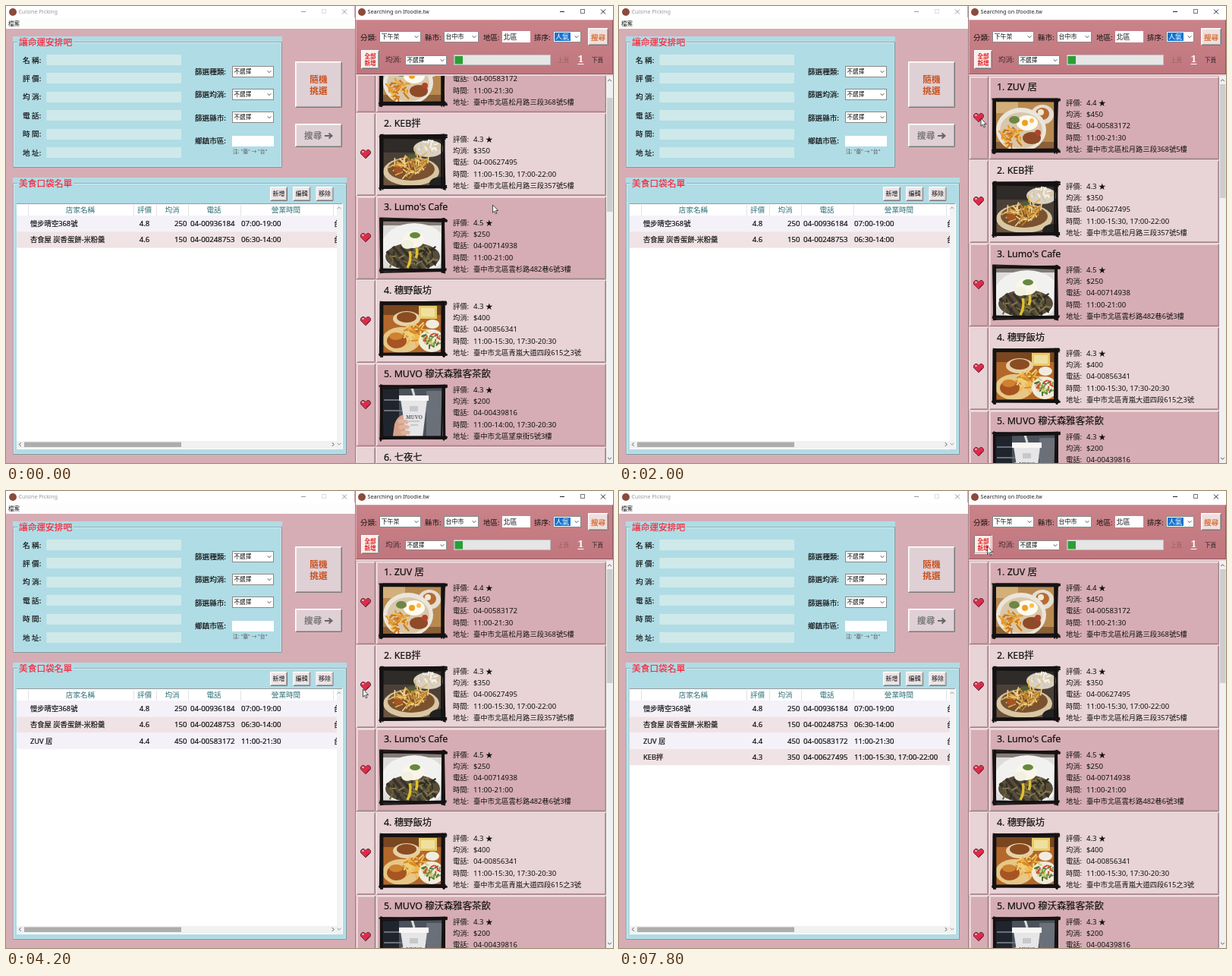
An HTML page that plays this animation: 800 px wide and 602 px high, repeating every 8 s.

```html
<!DOCTYPE html>
<html lang="zh-Hant">
<head>
<meta charset="utf-8">
<style>
html, body { margin: 0; width: 100%; height: 100%; overflow: hidden; background: #fff; }
svg { display: block; }
text { font-family: "Noto Sans", "Noto Sans CJK TC", "Noto Sans CJK", sans-serif; white-space: pre; }
.mid { font-weight: 500; stroke: currentColor; stroke-width: .2; }
.bold { font-weight: 700; }
.serif { font-family: "Noto Serif", serif; font-weight: 700; }
</style>
</head>
<body>
<svg id="stage" width="800" height="602" viewBox="0 0 800 602"></svg>
<script>
const LOOP = 8000, PINK = '#d6adb4', PALE = '#e8d3d6', BLUE = '#b0dce5';

// Drawing helpers; text is placed by its vertical centre
const rect = (x, y, w, h, fill, extra = '') =>
  `<rect x="${x}" y="${y}" width="${w}" height="${h}" fill="${fill}" ${extra}/>`;
const path = (d, stroke, width = 1, extra = '') =>
  `<path d="${d}" fill="none" stroke="${stroke}" stroke-width="${width}" ${extra}/>`;
const oval = (fill, x, y, rx, ry = rx) =>
  `<ellipse cx="${x}" cy="${y}" rx="${rx}" ry="${ry}" fill="${fill}"/>`;
const text = (x, y, str, size = 9.5, fill = '#111', cls = '', anchor = 'start') =>
  `<text x="${x}" y="${y + size * .37}" font-size="${size}" fill="${fill}" color="${fill}" class="${cls}" text-anchor="${anchor}">${str}</text>`;
const centred = (x, y, str, size, fill, cls) => text(x, y, str, size, fill, cls, 'middle');

const bevel = (x, y, w, h, light, dark) =>
  path(`M${x + .5} ${y + h - .5}V${y + .5}H${x + w - .5}`, light) +
  path(`M${x + w - .5} ${y + .5}V${y + h - .5}H${x + .5}`, dark);
const button = (x, y, w, h, fill) =>
  rect(x, y, w, h, fill) + bevel(x, y, w, h, '#fff', '#777') +
  bevel(x + 1, y + 1, w - 2, h - 2, '#f6eeef', '#aaa');
const chevron = (x, y, turn = 0, color = '#555') =>
  path('M-2.4 -1.2L0 1.2L2.4 -1.2', color, 1, `transform="translate(${x} ${y}) rotate(${turn})"`);
const combo = (x, y, w, h, str, size = 8) =>
  rect(x + .5, y + .5, w - 1, h - 1, '#fff', 'stroke="#888"') +
  text(x + 2.5, y + h / 2, str, size) + chevron(x + w - 6, y + h / 2);
const heading = (x, y, w, h, label) =>
  rect(x, y, w, h, BLUE) +
  bevel(x, y + 7, w, h - 7, '#8fadb3', '#7d979d') +
  bevel(x + 1, y + 8, w - 2, h - 9, '#d5eef3', '#c6e4ea') +
  rect(x + 6, y + 2, 74, 11, BLUE) + text(x + 8, y + 7.5, label, 11.7, '#ff1f35', 'mid');
const titleBar = (x, w, h, str, color, faint, iconColor) =>
  rect(x, 0, w, h, '#fff') + oval(iconColor, x + 9, 8, 5) +
  text(x + 16.5, 7.5, str, 7.3, color) +
  path(`M${x + w - 70} 7.5h6`, color) +
  rect(x + w - 42.5, 4.5, 5, 5, 'none', `stroke="${faint}"`) +
  path(`M${x + w - 16} 4.5l6 6m0 -6l-6 6`, color);

function leftWindow() {
  let s = rect(0, 0, 460, 602, PINK) + rect(0, 15, 460, 15, '#fdfdfd') +
    titleBar(0, 459, 16, 'Cuisine Picking', '#999', '#ddd', '#8c4a3c') +
    text(3, 23, '檔案', 7.5, '#222') +
    heading(9, 40, 355, 173, '讓命運安排吧');

  ['名 稱', '評 價', '均 消', '電 話', '時 間', '地 址'].forEach((label, i) => {
    const y = 71 + i * 24.4;
    s += text(22, y, label + ':', 9.6, '#111', 'mid') +
      rect(53.5, Math.round(y - 7), 177.5, 14, '#cfe9ea');
  });
  ['篩選種類', '篩選均消', '篩選縣市', '鄉鎮市區'].forEach((label, i) => {
    const y = 86.5 + i * 30.4;
    s += text(249, y, label + ':', 9.6, '#111', 'mid') +
      (i < 3 ? combo(298, Math.round(y - 8), 55, 15, '不選擇', 7.6) : rect(298, 171, 55, 14, '#fff'));
  });
  s += text(299, 191, '注: "臺" → "台"', 6.8, '#555') +
    button(381, 73, 62, 61, '#dfd0d5') +
    centred(412, 97, '隨機', 11.7, '#c8501e', 'bold') + centred(412, 111.5, '挑選', 11.7, '#c8501e', 'bold') +
    button(381, 155, 62, 31, '#dfd0d5') + text(393, 171, '搜尋', 11.7, '#777', 'bold') +
    path('M420 171h9m-3.5 -3.5l4 3.5l-4 3.5', '#666', 2) +
    heading(9, 226, 440, 365, '美食口袋名單');

  ['新增', '編輯', '移除'].forEach((label, i) => {
    s += button(348 + i * 30.3, 238, 23, 19, '#ece4e6') + centred(359.5 + i * 30.3, 247.5, label, 8);
  });

  s += rect(14, 260, 430, 324, '#fff') + path('M14 260.5H443', '#999');
  [['店家名稱', 98], ['評價', 182.5], ['均消', 219], ['電話', 274], ['營業時間', 369]]
    .forEach(([label, x]) => s += centred(x, 268, label, 9.6, '#2c6f78'));
  [29, 168, 198, 240, 309, 431].forEach(x => s += path(`M${x}.5 262v14`, '#e2e2e2'));
  s += '<g id="rows"></g>' +
    rect(436, 261, 7, 323, '#f3f3f3') + rect(14, 573, 429, 10, '#f1f1f1') +
    rect(24, 574.5, 207, 6.5, '#adadad') +
    chevron(439, 266, 180, '#999') + chevron(439, 577, 0, '#999') +
    chevron(18.5, 577.5, 90) + chevron(431, 577.5, -90);
  return s;
}

const shops = [
  ['ZUV 居', '4.4', 450, '04-00583172', '11:00-21:30', '臺中市北區松月路三段368號5樓'],
  ['KEB拌', '4.3', 350, '04-00627495', '11:00-15:30, 17:00-22:00', '臺中市北區松月路三段357號5樓'],
  ["Lumo's Cafe", '4.5', 250, '04-00714938', '11:00-21:00', '臺中市北區雲杉路482巷6號3樓'],
  ['穗野飯坊', '4.3', 400, '04-00856341', '11:00-15:30, 17:30-20:30', '臺中市北區青嵐大道四段615之3號'],
  ['MUVO 穆沃森雅客茶飲', '4.3', 200, '04-00439816', '11:00-14:00, 17:30-20:30', '臺中市北區望泉街5號3樓'],
  ['七夜七', '4.3', 300, '04-00391627', '11:00-21:00', '臺中市北區望泉街7號3樓'],
];
const saved = [
  ['慢步晴空368號', '4.8', 250, '04-00936184', '07:00-19:00'],
  ['杏食屋 炭香蛋餅-米粉羹', '4.6', 150, '04-00248753', '06:30-14:00'],
  shops[0], shops[1],
];

const tableRow = ([name, stars, cost, phone, hours], i) => {
  const y = 276 + i * 21.3, c = y + 10.5;
  return rect(14, y, 422, 21.3, i % 2 ? '#f0e3e5' : '#f4f1f9') +
    text(32, c, name, 9.3, '#111', 'mid') + centred(182.5, c, stars, 9.6, '#111', 'mid') +
    text(238.5, c, cost, 9.6, '#111', 'mid', 'end') + text(243, c, phone, 9.7, '#111', 'mid') +
    text(310, c, hours, 9.7, '#111', 'mid') +
    `<svg x="432" y="${y}" width="4" height="21">${text(0, 10.5, '台', 9.3, '#111', 'mid')}</svg>`;
};

// Small seeded generator
function seeded(seed) {
  return () => (seed = (seed * 16807) % 2147483647) / 2147483647;
}

// Many short strokes scattered in an ellipse
function strands(seed, n, cx, cy, rx, ry, colors, len, width) {
  const rnd = seeded(seed);
  let s = '';
  for (let i = 0; i < n; i++) {
    const a = rnd() * 6.28, r = Math.sqrt(rnd()), b = rnd() * 6.28;
    const x = cx + rx * r * Math.cos(a), y = cy + ry * r * Math.sin(a);
    s += path(`M${x.toFixed(1)} ${y.toFixed(1)}l${(len * Math.cos(b)).toFixed(1)} ${(len * Math.sin(b)).toFixed(1)}`,
      colors[i % colors.length], width);
  }
  return s;
}

const photos = [
  () => rect(0, 0, 90, 74, '#b98a50') + rect(0, 0, 34, 20, '#d3b07a') + rect(0, 58, 90, 16, '#8a6138') +
    oval('#e4ddd2', 66, 22, 15, 13) + oval('#b56b36', 66, 21, 9, 8) + oval('#f3e8cd', 64, 19, 4) +
    oval('#eae5dc', 38, 42, 33, 29) + oval('#d9c7a8', 38, 43, 28, 24) +
    strands(7, 50, 24, 51, 14, 12, ['#e2952c', '#c87422', '#f1bd54'], 7, 2) +
    oval('#fffaf0', 46, 33, 14, 10) + oval('#f0a020', 43, 33, 4) + oval('#f7c04c', 52, 30, 3) +
    oval('#8f4a28', 52, 53, 12, 8) + oval('#6f8645', 29, 29, 7, 5) + oval('#b3422f', 60, 46, 4),
  () => rect(0, 0, 90, 74, '#4b4038') + rect(0, 0, 90, 24, '#2e2b29') + rect(0, 56, 90, 18, '#6b5340') +
    oval('#d8d0c1', 65, 19, 20, 11) + strands(3, 25, 65, 16, 16, 7, ['#f6f1e7', '#d9c6a4'], 6, 2) +
    oval('#d9c6a2', 42, 49, 37, 19) + oval('#7a5230', 42, 46, 31, 15) +
    strands(11, 65, 42, 40, 22, 12, ['#e3b252', '#bd832e', '#f0d28a'], 11, 1.6) +
    oval('#4d6035', 43, 29, 6, 3) + oval('#a65425', 25, 47, 6, 4) + oval('#222', 80, 65, 14, 9),
  () => rect(0, 0, 90, 74, '#dddcdb') + rect(0, 0, 90, 10, '#857b75') + oval('#f1f1f0', 46, 40, 44, 33) +
    oval('#574d3a', 44, 51, 36, 18) +
    path('M10 44L32 68M18 38L44 70M28 38L56 69M42 42L66 66M54 42L75 61', '#39322a', 4) +
    strands(19, 45, 44, 51, 31, 14, ['#6d6541', '#81794b', '#2f2c22'], 9, 2) +
    oval('#f9f6e9', 45, 29, 14, 11) + oval('#f2f0df', 37, 35, 8, 6) +
    oval('#66893d', 47, 23, 7, 4) + path('M40 44Q43 55 37 66M49 40Q51 46 48 53', '#e3c02d', 3.5),
  () => rect(0, 0, 90, 74, '#b3682a') + rect(0, 0, 90, 18, '#7a461f') + rect(52, 6, 24, 17, '#e8cb68') +
    rect(55, 9, 18, 11, '#efe0a2') + oval('#e5d1a9', 36, 23, 18, 10) + oval('#8b4c22', 36, 21, 13, 7) +
    oval('#e6c785', 29, 51, 25, 17) + oval('#a75423', 23, 52, 13, 10) + oval('#cf8230', 22, 46, 9, 5) +
    strands(23, 42, 48, 42, 15, 11, ['#f1b544', '#d68a29', '#f4d071'], 9, 2) +
    oval('#f1eadb', 69, 52, 17, 15) + strands(5, 35, 70, 50, 11, 9, ['#7b9c43', '#4e742e', '#d7442f', '#bfd47d'], 6, 2) +
    oval('#f2ece0', 70, 30, 9, 6),
  () => rect(0, 0, 90, 74, '#4b525c') + rect(0, 0, 26, 74, '#20252d') + rect(62, 8, 28, 66, '#6b7078') +
    path('M6 20H84M6 34H84', '#68727d', 2) +
    '<path d="M17 74L20 52Q24 39 36 39L44 74Z" fill="#d5a18a"/>' +
    '<path d="M28 19H63L57 70H36Z" fill="#e6e5e8"/><path d="M26 14H65V21H26Z" fill="#f8f7f5"/>' +
    path('M46 14L43 4', '#ddd', 3) + rect(40, 28, 11, 7, '#c8c8c8') + centred(46, 42, 'MUVO', 7, '#68635f', 'serif') +
    path('M39 48H53M41 53H51', '#aaa') + path('M25 49Q32 46 38 50M26 57Q34 53 39 57M29 64Q35 61 40 64', '#e1b29e', 5),
];

// Ink-brushed frame around a picture
function brushFrame(seed) {
  const rnd = seeded(seed), j = n => (rnd() - .5) * n;
  let s = '';
  for (let i = 0; i < 6; i++) {
    const k = 3 + j(3);
    s += path(`M${k + j(5)} ${k + j(2)}L${88 + j(4)} ${k + j(3)}M${87 - k + j(2)} ${1 + j(3)}L${87 - k + j(3)} ${72 + j(4)}` +
      `M${88 + j(4)} ${72 - k + j(2)}L${1 + j(4)} ${72 - k + j(3)}M${k + j(2)} ${73 + j(3)}L${k + j(2)} ${1 + j(3)}`,
      '#151213', 1.9);
  }
  return s;
}

const heart = (x, y) =>
  `<g transform="translate(${x} ${y})"><path d="M0 6L-6.5 -.5V-3.5L-4.5 -5.5H-2L0 -3.5L2 -5.5H4.5L6.5 -3.5V-.5Z" fill="#dd2c4a" stroke="#5a3a42"/>` +
  rect(-4.5, -4, 2, 2, '#ffc2cb') + path('M1 4L5 0', '#a8183a', 1.4) + '</g>';

const cell = (x, y, w) =>
  bevel(x, y, w, 109, '#f3e5e7', '#a18388') + bevel(x + 1, y + 1, w - 2, 107, '#e6cdd1', '#bb9da2');

function shopCard([name, stars, cost, phone, hours, address], i) {
  const y = 93 + i * 110, fill = i % 2 ? PALE : PINK;
  let s = rect(461, y, 330, 110, fill) + cell(462, y, 25) + cell(488, y, 303) +
    heart(474, y + 54) + text(498, y + 13.5, `${i + 1}. ${name}`, 12.4, '#111', 'mid');
  if (photos[i]) {
    s += `<g transform="translate(492 ${y + 28})"><svg x="3" y="3" width="83" height="67" viewBox="3 3 83 67">${photos[i]()}</svg>` +
      brushFrame(31 + i * 97) + '</g>';
  }
  [['評價', stars + ' ★'], ['均消', '$' + cost], ['電話', phone], ['時間', hours], ['地址', address]]
    .forEach(([label, value], k) => {
      const c = y + 34.5 + k * 15.2;
      s += text(589, c, label + ':', 9.3) + text(616, c, value, k === 4 ? 9.3 : 9.6);
    });
  return s;
}

function rightWindow() {
  return '<linearGradient id="bar" x2="0" y2="1"><stop stop-color="#c98389"/><stop offset="1" stop-color="#c1767e"/></linearGradient>' +
    rect(460, 0, 340, 602, PINK) +
    `<svg x="461" y="92" width="330" height="510" viewBox="461 92 330 510"><g id="list">${shops.map(shopCard).join('')}</g></svg>` +
    rect(791, 92, 9, 510, '#f0f0f0') + rect(792, 103, 7.5, 150, '#cdcdcd', 'id="thumb"') +
    chevron(795.5, 98, 180) + chevron(795.5, 596) +
    rect(461, 18, 339, 72, 'url(#bar)') + bevel(461, 18, 339, 72, '#dba9af', '#8d5b61') +
    path('M461 91H800', '#e9d3d6', 2) +
    titleBar(460, 340, 18, 'Searching on Ifoodie.tw', '#222', '#777', '#8c4a3c') +
    path('M460.5 0V602', '#a58087') +
    text(467, 41, '分類:') + combo(492, 33, 55, 15, '下午茶') +
    text(552, 41, '縣市:') + combo(577, 33, 46, 15, '台中市') +
    text(629, 41, '地區:') + rect(654, 33, 37, 15, '#fff') + text(655.5, 41, '北區', 9) +
    text(696, 41, '排序:') + combo(721, 33, 37, 15, '') + rect(723, 35, 21, 11, '#1874cd') +
    text(724, 40.5, '人氣', 9, '#fff') +
    button(767, 29, 27, 23, '#f0dfdf') + centred(780.5, 41, '搜尋', 9.6, '#d2621e', 'mid') +
    button(468, 58, 24, 25, '#fbeeee') +
    `<g id="addAll" visibility="hidden">${bevel(468, 58, 24, 25, '#777', '#fff')}</g>` +
    centred(480, 66, '全部', 7.6, '#e02020', 'bold') + centred(480, 75.5, '新增', 7.6, '#e02020', 'bold') +
    text(500, 71, '均消:', 9.3, '#3b2a2c') + combo(526, 65, 55, 13, '不選擇', 7.6) +
    rect(590.5, 64.5, 127, 13, '#e6e6e6', 'stroke="#bcbcbc"') + rect(591.5, 66, 10.5, 10.5, '#2b9f35') +
    text(727, 71, '上頁', 7.6, '#965f65') + text(772, 71, '下頁', 7.6, '#222') +
    centred(757.5, 69.5, '1', 13, '#fff', 'serif') + path('M753.5 76.5h8', '#fff');
}

const stage = document.getElementById('stage');
stage.innerHTML = leftWindow() + rightWindow() +
  `<g id="press" visibility="hidden">${bevel(465, 138, 19, 19, '#2b2024', '#5c464b')}</g>` +
  '<path id="cursor" d="M0 0V10.2L2.3 8.1L3.9 11.8L5.5 11.1L3.9 7.5H7.1Z" fill="#fff" stroke="#222" stroke-width=".8"/>';
const get = id => document.getElementById(id);
const [list, thumb, rows, press, addAll, cursor] =
  ['list', 'thumb', 'rows', 'press', 'addAll', 'cursor'].map(get);
rows.innerHTML = saved.map((shop, i) => `<g>${tableRow(shop, i)}</g>`).join('');

// Pointer: time, x, y; each place is held until the next
const route = [
  [0, 641.5, 262], [400, 602, 238], [600, 546, 196], [800, 497, 160], [1200, 486.5, 150],
  [1400, 480, 149], [1800, 477, 148], [2400, 476.5, 147], [3600, 475, 165], [3800, 474, 205],
  [4000, 472, 245], [4200, 470.5, 261], [4600, 472.5, 259], [6000, 474, 240], [6200, 477, 195],
  [6400, 480, 145], [6600, 482, 105], [6800, 483, 82], [7000, 483, 76], [7200, 484, 74], [7400, 485.5, 73],
];
const show = (el, on) => el.setAttribute('visibility', on ? 'visible' : 'hidden');
const within = (t, a, b) => t >= a && t < b;

function draw(now) {
  const t = now % LOOP;
  const scroll = t < 200 ? 62 : 0;
  list.setAttribute('transform', `translate(0 ${-scroll})`);
  thumb.setAttribute('y', 103 + scroll * .29);

  show(rows.children[2], t >= 3000);
  show(rows.children[3], t >= 4800);

  const second = within(t, 4600, 4800);
  show(press, second || within(t, 2800, 3000));
  press.setAttribute('transform', `translate(0 ${second ? 110 : 0})`);
  show(addAll, t >= 7800);

  const [, x, y] = route.filter(p => p[0] <= t).pop();
  cursor.setAttribute('transform', `translate(${x} ${y})`);
  requestAnimationFrame(draw);
}
draw(0);
</script>
</body>
</html>
```
